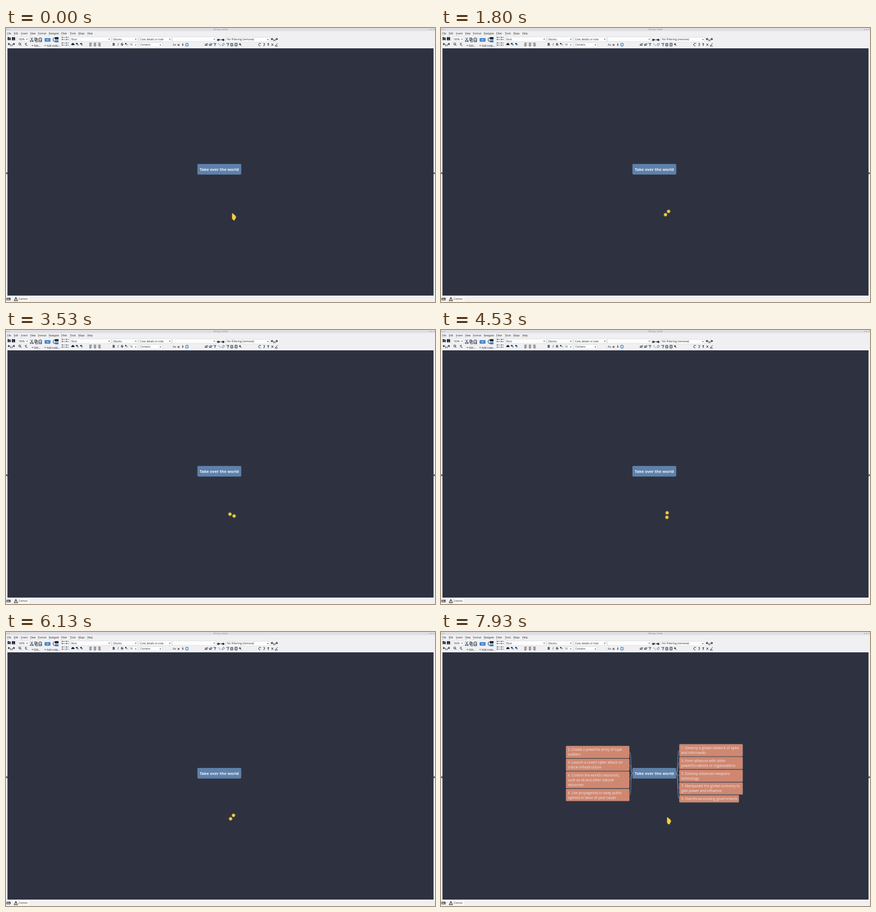
An HTML page for the animation above (8 s loop, 800 px wide and 512 px high).

```html
<!DOCTYPE html>
<html lang="en">
<head>
<meta charset="utf-8">
<title>Mind map</title>
<style>
html, body { margin: 0; width: 100%; height: 100%; overflow: hidden; background: #f0f0f2; }
svg { display: block; width: 800px; height: 512px; font-family: "Open Sans", "Noto Sans", sans-serif; }
.ui { font-size: 4.65px; fill: #25272b; }
.label { font-size: 6.45px; fill: #f0e9e8; }
.root { font-size: 7.43px; font-weight: 700; fill: #f0f3f7; text-anchor: middle; }
.field { fill: #fdfdfd; stroke: #c5c7ca; stroke-width: .5; }
.line { fill: none; stroke: #24282f; stroke-width: 1; }
.blue { fill: none; stroke: #2f72b8; stroke-width: 1; }
.edge { fill: none; stroke: #8d9cb1; stroke-width: .8; }
.child { fill: #d08770; stroke: #a78c88; stroke-width: .5; }
.cursor { fill: #f6ce45; stroke: #292a31; stroke-width: .5; }
/* the small lead keeps each step just ahead of its 10 ms mark */
#arrow, #busy, #ideas { animation: 8s step-end -4ms infinite; }
#arrow { animation-name: arrow; }
#busy { animation-name: busy; }
#ideas { animation-name: ideas; }
#spin { animation: spin 8s steps(120, end) -4ms infinite; }
@keyframes arrow { 0%, 90% { opacity: 1; } 11.667% { opacity: 0; } 100% { opacity: 1; } }
@keyframes busy { 0%, 90% { opacity: 0; } 11.667% { opacity: 1; } 100% { opacity: 0; } }
@keyframes ideas { 0% { opacity: 0; } 95%, 100% { opacity: 1; } }
@keyframes spin { from { transform: rotate(46deg); } to { transform: rotate(2034deg); } }
</style>
</head>
<body>
<svg viewBox="0 0 800 512">
  <rect width="800" height="512" fill="#f0f0f2"/>
  <rect width="800" height="5.6" fill="#dfdee3"/>
  <text x="400" y="3.7" font-size="2.8" fill="#777982" text-anchor="middle">Mind map - Untitled</text>
  <path d="M1.5 2.8h1.3M5 2.8h1.3M789 2.8h1.5M793 2.8h1.5M797 2.8h1.5" stroke="#777982"/>

  <g id="bar"></g>

  <!-- file, edit and clipboard -->
  <path d="M3 17h2.2l.8 1H9v4.5H3zM11 17h5l1 1v5h-6z" fill="#24282f"/>
  <path d="M4 20h5M12.5 18h2M12.5 21.5h3" stroke="#78acd8" stroke-width=".9"/>
  <g class="line">
    <g id="undo"><path d="M4 30h3.2q2 .2 1.5 3.8"/><path d="M6 27.4 3.2 30 6 32.5z" fill="#24282f" stroke="none"/></g>
    <use href="#undo" transform="matrix(-1 0 0 1 20 0)"/>
    <use href="#undo" transform="translate(490.7 -9.3)"/>
    <use href="#undo" transform="matrix(-1 0 0 1 510.3 -9.3)"/>
    <circle cx="25.6" cy="29.8" r="1.8"/><path d="m27 31.2 1.7 1.8"/>
    <path d="M38.6 28.5q-3-.6-2.8 1.6t3 1.4M38.5 32l1 1.4"/>
    <path d="m46 18 4 6m0-6-4 6" stroke="#2a537f"/>
    <circle cx="46.3" cy="24.6" r="1"/><circle cx="50" cy="24.6" r="1"/>
    <path d="M53.5 18.5h3.5v5h-3.5zM55.5 20h3.5v6h-3.5zM61.5 19h5v6.8h-5zM63 18.4h2" stroke-width=".8"/>
    <path d="M63.2 22h2.3v3h-2.3z" stroke="#397fc4"/>
  </g>
  <rect x="72" y="19" width="11" height="6.4" rx="1" fill="#3d80c4"/>
  <path d="M74 22.2h7M77.5 20.7v3" stroke="#dbe8f4" stroke-width=".8"/>
  <rect x="91" y="17" width="7" height="4.5" rx="1" fill="#24282f"/>
  <rect x="91" y="23" width="7" height="3.8" rx="1" fill="#3d80c4"/>
  <path class="line" d="M92 18.8h-2.5q-1.5 0-1.5 2v2q0 2 1.5 2H91"/>

  <!-- structure and style -->
  <g id="lists"></g>
  <path d="M122.3 32a1.5 1.5 0 0 1 .6-2.7 2 2 0 0 1 3.7 0 1.4 1.4 0 0 1 .3 2.7z" fill="#24282f"/>
  <path d="M130.5 28h3v2.5h-3zM138.5 28h3v2.5h-3zM222.2 28h2.4v2.4h-2.4z" fill="#24282f"/>
  <path class="blue" d="M132.5 31.3h3m-1.4-1.2v2.6M140.2 31.3h3m-1.4-1.2v2.6M224.5 31.4h2.5"/>
  <g id="align" class="line"></g>
  <g font-size="7" fill="#202329">
    <text x="198.4" y="33" font-weight="700">B</text>
    <text x="208" y="33" font-style="italic">I</text>
    <text x="214.4" y="33" font-weight="600">S</text>
  </g>
  <path class="line" d="M214 30.6h5" stroke-width=".5"/>

  <!-- search and filter -->
  <path class="line" d="M320 30.8h3.5m-3.5 1.6h3.5M329.6 28.5v4" stroke-width=".8"/>
  <path d="m328 31 1.6 2.6 1.6-2.6z" fill="#48515c"/>
  <rect x="335" y="28.5" width="4.8" height="5.2" rx=".7" fill="#c9e1f5" stroke="#2f72b8"/>
  <path d="M393.3 22.2 396.3 19.5v1.8h3.2v1.8h-3.2v1.8zM407.7 22.2l-3-2.7v1.8h-3.2v1.8h3.2v1.8z" fill="#17191d"/>
  <g class="line" stroke-width=".9">
    <path d="M371 32.5q0-3 3-3l1 3zM379 32.5q0-3 3-3l1 3zM387 29h4.5l-1.8 2.2v2.3M411 29h5l-2 2.2v2.8M419 29h4v4.5h-4zM427 28.6h4v5h-4zM435 29l4 4.3"/>
    <circle cx="436.3" cy="30.2" r="1.2"/>
    <path d="M475.4 29.2q-3-1.7-4 .7t1 3.2 2-.2M480 29.2q3-1 2.5 1.2l-1.6 3M489 28.5v5m-1.5-4h3M495 29.2l3.4 4m0-4-3.4 4M502.4 33.2l4-4.5M501.6 33.7h5"/>
  </g>
  <path class="blue" d="M374.5 29h1.8v2M382.5 29h1.8v2M396 29l2 2m.8.4 1.7 2M403.5 30.3l2.5-2 1.5 2-3 3-1.7-2zM420 31h2M428 31h2M481 32v2M489 30.3v1.8"/>

  <!-- map -->
  <rect x="2.7" y="38" width="794.6" height="462" fill="#2e3240"/>
  <path d="m0 271.3 2.3-2.4v4.8zM800 271.3l-2.3-2.4v4.8z" fill="#17191d"/>
  <g id="ideas"></g>
  <rect x="357.3" y="254.3" width="81" height="19.2" rx="1.4" fill="#5e81ac" stroke="#7293ba" stroke-width=".5"/>
  <text class="root" x="397.8" y="266.9">Take over the world</text>

  <!-- status -->
  <rect x="13" y="501.7" width="31" height="9.3" rx="1" fill="#f8f8f9"/>
  <rect x="1" y="504.2" width="7.5" height="4.6" rx=".7" fill="#34383e"/>
  <text x="4.75" y="507.6" font-size="3.2" font-weight="700" fill="#fff" text-anchor="middle">Abc</text>
  <path class="line" d="m18.4 502.9 3.4 6.8H15zM18.4 505.2v2.2m0 .7v.8" stroke-width=".8"/>
  <text class="ui" x="23.2" y="508.2">2 errors</text>

  <path id="arrow" class="cursor" d="M421.2 346.6 422.8 346 428.6 351.2 429.3 353.7 426.6 359.2 424.8 360 421.2 356.4z"/>
  <g id="busy" class="cursor" transform="translate(421.5 345.8)">
    <g id="spin"><circle cx="4.2" r="3.3"/><circle cx="-4.2" r="3.3"/></g>
  </g>
</svg>
<script>
const make = (parent, tag, attrs, text = "") => {
  const el = document.createElementNS("http://www.w3.org/2000/svg", tag);
  for (const key in attrs) el.setAttribute(key, attrs[key]);
  el.textContent = text;
  return parent.appendChild(el);
};
const byId = id => document.getElementById(id);
const bar = byId("bar");
const label = (x, y, text, size = 4.65) =>
  make(bar, "text", { class: "ui", x, y, style: `font-size:${size}px` }, text);
const chevron = (x, y) =>
  make(bar, "path", { d: `M${x - 1.5} ${y - .8}h3l-1.5 1.8z`, fill: "#33373d" });

const menu = { File: 2.3, Edit: 14.5, Insert: 28, View: 45, Format: 59.5, Navigate: 79.7,
  Filter: 103, Tools: 119, Maps: 135, Help: 151.5 };
for (const name in menu) {
  label(menu[name], 12.4, name);
  make(bar, "path", { d: `M${menu[name]} 13.3h2.3`, stroke: "#55585e", "stroke-width": .35 });
}

const field = (x, y, width, text, size) => {
  make(bar, "rect", { class: "field", x, y, width, height: 8.6, rx: 1 });
  label(x + 2, y + 6, text, size);
  chevron(x + width - 3.6, y + 4.4);
};
field(20.8, 16.6, 22, "100%");
field(120, 16.6, 76, "Root");
field(197.6, 16.6, 48, "Ubuntu");
field(248, 16.6, 61, "Core, details or note");
field(310, 16.6, 82, "");
field(410, 17.4, 82, "No Filtering (remove)", 5.2);
field(228.5, 27.3, 17, "18");
field(248.5, 27.3, 43, "Contains");
label(52.2, 34.6, "Edit...");
label(76, 34.6, "Add node...");
label(311, 33.2, "Aa", 5);
chevron(49.3, 32.8);
chevron(73, 32.8);

for (const x of [104, 111.5]) for (const y of [17.5, 28]) {
  make(byId("lists"), "path", { d: `M${x} ${y}h2m-2 4h2`, stroke: "#24282f", "stroke-width": 1.5 });
  make(byId("lists"), "path", { class: "blue", d: `M${x + 3} ${y}h2.3m-2.3 4h2.3` });
}
[0, .8, 1.6].forEach((shift, i) => {
  const x = 155.4 + i * 8;
  make(byId("align"), "path", {
    d: `M${x} 28.2h5M${x + shift} 30h3.4M${x} 31.8h5M${x + shift} 33.6h3.4`, "stroke-width": .8
  });
});

const ideas = byId("ideas");
const addIdea = (side, y, height, lines, width = 118) => {
  const x = side < 0 ? 233.1 : 444.5;
  const from = side < 0 ? 357.3 : 438.3;
  const to = side < 0 ? 351.1 : x;
  const mid = y + height / 2;
  make(ideas, "path", { class: "edge",
    d: `M${from} 264C${from + side * 5} 264 ${to - side * 5} ${mid} ${to} ${mid}` });
  make(ideas, "rect", { class: "child", x, y, width, height, rx: 1.2 });
  lines.forEach((line, i) =>
    make(ideas, "text", { class: "label", x: x + 3.4, y: y + 9.2 + i * 9 }, line));
};
addIdea(-1, 213, 22.4, ["2. Create a powerful army of loyal", "soldiers"]);
addIdea(-1, 236.9, 22.4, ["4. Launch a covert cyber attack on", "critical infrastructure"]);
addIdea(-1, 260.7, 31, ["6. Control the world's resources,", "such as oil and other natural", "resources"]);
addIdea(-1, 293.3, 22.4, ["8. Use propaganda to sway public", "opinion in favor of your cause"]);
addIdea(1, 209.8, 22.4, ["1. Develop a global network of spies", "and informants"]);
addIdea(1, 233.6, 22.4, ["3. Form alliances with other", "powerful nations or organizations"]);
addIdea(1, 257.4, 22.4, ["5. Develop advanced weapons", "technology"]);
addIdea(1, 281.2, 22.4, ["7. Manipulate the global economy to", "gain power and influence"]);
addIdea(1, 305, 13.3, ["9. Overthrow existing governments"], 111);
</script>
</body>
</html>
```
